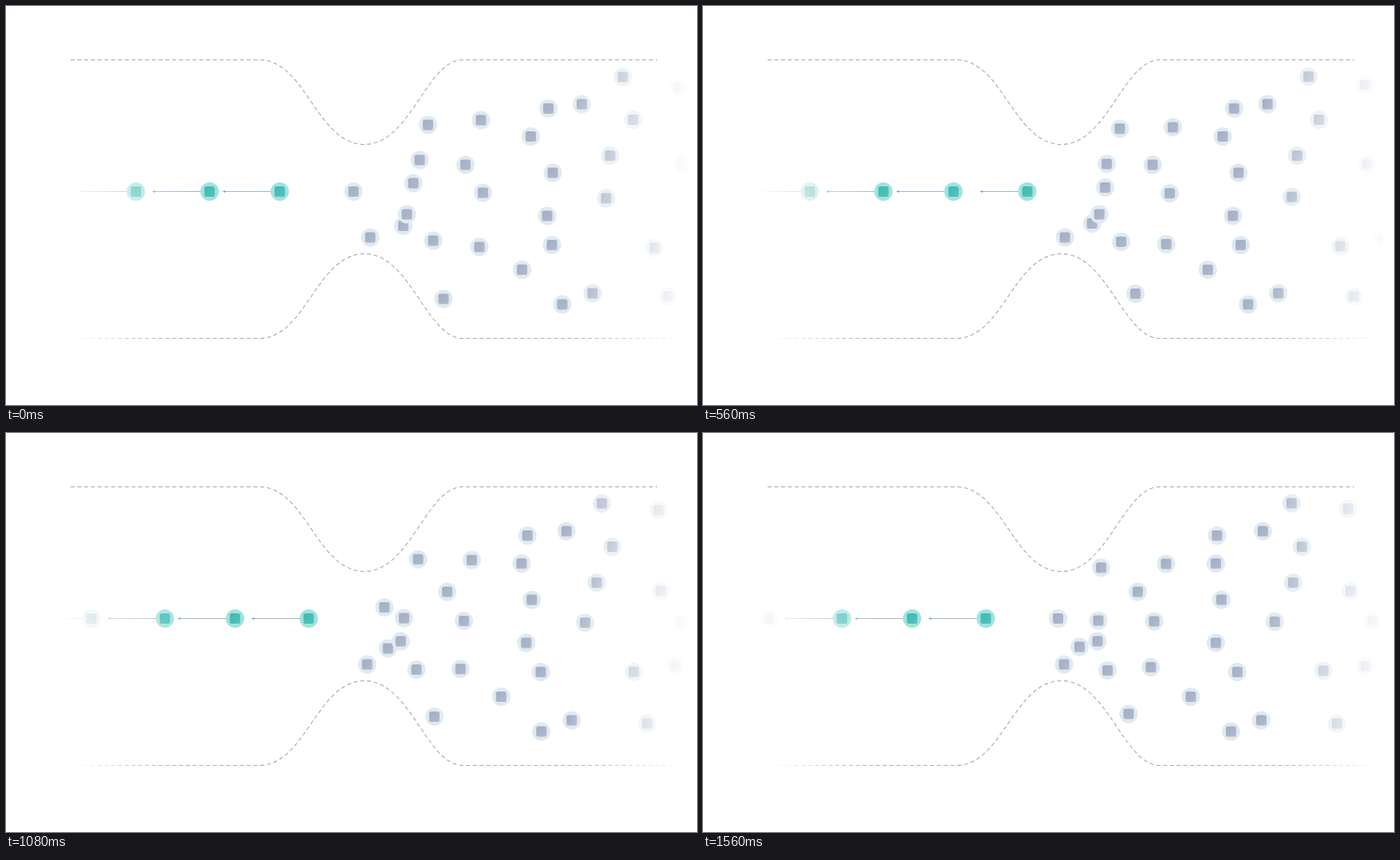
Write an HTML page that moves like this. It is 867x500 px and loops after 1.6 s.

```html
<!DOCTYPE html>
<html lang="en">
<head>
<meta charset="utf-8">
<title>Bottleneck flow</title>
<style>
  html, body { margin: 0; width: 100%; height: 100%; overflow: hidden; background: #fff; }
  svg { display: block; width: 100vw; height: 100vh; }
</style>
</head>
<body>
<svg viewBox="0 0 867 500" preserveAspectRatio="none">
  <defs>
    <linearGradient id="left" gradientUnits="userSpaceOnUse" x1="65" x2="225">
      <stop offset="0" stop-color="#fff"/>
      <stop offset="1" stop-color="#fff" stop-opacity="0"/>
    </linearGradient>
    <linearGradient id="right" gradientUnits="userSpaceOnUse" x1="705" x2="858">
      <stop offset="0" stop-color="#fff" stop-opacity="0"/>
      <stop offset="1" stop-color="#fff"/>
    </linearGradient>
    <linearGradient id="shine" x2="1" y2="1">
      <stop offset="0" stop-color="#fff" stop-opacity="0"/>
      <stop offset="1" stop-color="#fff" stop-opacity=".14"/>
    </linearGradient>
    <linearGradient id="floor" gradientUnits="userSpaceOnUse" x1="81" x2="840">
      <stop offset="0" stop-color="#a9b6cc" stop-opacity="0"/>
      <stop offset=".16" stop-color="#a9b6cc"/>
      <stop offset=".33" stop-color="#a6a9b1"/>
      <stop offset=".64" stop-color="#a6a9b1"/>
      <stop offset=".85" stop-color="#a9b6cc"/>
      <stop offset="1" stop-color="#a9b6cc" stop-opacity=".1"/>
    </linearGradient>
  </defs>
  <g id="links"></g>
  <g id="dots"></g>
  <rect width="225" height="500" fill="url(#left)"/>
  <rect x="705" width="162" height="500" fill="url(#right)"/>
  <g fill="none" stroke-width="1.1" stroke-dasharray="5 3.5">
    <path stroke="#a6a9b1" d="M81 67.5H318C376 67.5 390 173.5 450 173.5C507 173.5 528 67.5 573 67.5H817"/>
    <path stroke="url(#floor)" d="M81 416.5H318C376 416.5 390 310.5 450 310.5C507 310.5 528 416.5 573 416.5H840"/>
  </g>
</svg>
<script>
const LOOP = 1600, STEP = 40, END = 1560, MID = 232.5;
const SPEED = 0.052, GAP = 71.5, MERGE = 1120;
const SLATE = [[225, 234, 240], [162, 175, 195]];
const TEAL = [[159, 228, 222], [62, 184, 178]];

const clamp = v => Math.max(0, Math.min(1, v));
const mix = (a, b, k) => a + (b - a) * k;
const smooth = v => v * v * (3 - 2 * v);
const easeOut = (t, power) => 1 - (1 - t / END) ** power;

const glide = (x, y, dx, dy, power) => t => {
  const k = easeOut(t, power);
  return [x + dx * k, y + dy * k];
};

// Drifts left, a little slower close to the neck.
const roam = ([x, y, dy = 0]) =>
  glide(x, y, -26 - 9.5 * clamp((x - 498) / 150), dy, 1.14);

// Creeps forward while the neck is busy.
const creep = ([x, y, dy = 0]) => glide(x, y, -15, dy, 1.25);

// Comes to rest after a short way.
const brake = ([x, y, reach]) => glide(x, y, -reach, 0, 2.8);

// Creeps until its turn, then curves into the neck.
const merge = ([x, y, wake]) => t => {
  const wait = Math.min(t, wake);
  const cx = x - 0.0115 * wait, cy = y + 0.0085 * wait;
  const v = clamp((t - wake) / MERGE);
  return [mix(cx, 445.5, v), mix(cy, MID, smooth(v))];
};

// Passes along the axis.
const cruise = x => t => [x - SPEED * t, MID];

const roaming = [
  [498.5, 275.5, -7.5], [536, 294, 3.5], [576.5, 199], [598.5, 234, 2],
  [594, 302, -8.5], [647.5, 330.5], [679, 263], [680.5, 128.5], [686, 209],
  [698, 374], [736, 360], [753, 241, -4.5], [774, 89, -1], [787, 142.5],
  [814, 303, -5], [831, 364], [845, 102, -7], [848, 198], [867, 292], [876, 236]
];
const creeping = [
  [511, 222, 13], [549, 367, -15], [596, 143, 21], [658.5, 163.5]
];
const braking = [
  [457, 290, 4], [503, 261, 8], [685, 299.5, 14.5], [722.5, 123, 20], [758, 187.5, 17.5]
];
const merging = [[519, 193, 440], [529.5, 149, 1320]];
const line = [163, 255.5, 343.5, 436].map(cruise);

function add(parent, tag, attrs = {}) {
  const el = document.createElementNS("http://www.w3.org/2000/svg", tag);
  for (const key in attrs) el.setAttribute(key, attrs[key]);
  return parent.appendChild(el);
}

const dotLayer = document.getElementById("dots");
const linkLayer = document.getElementById("links");

function makeDot(path) {
  const g = add(dotLayer, "g");
  const box = { x: -6.5, y: -6.5, width: 13, height: 13, rx: 2.8 };
  const halo = add(g, "circle", { r: 11.5 });
  const core = add(g, "rect", box);
  add(g, "rect", { ...box, fill: "url(#shine)" });
  return { path, g, halo, core };
}

function makeLink(path, i) {
  const stem = add(linkLayer, "path", { stroke: "#9fb6cf" });
  const head = add(linkLayer, "path", { fill: "#719fb8" });
  return { path, stem, head, grows: i === line.length - 1 };
}

const dots = [
  ...roaming.map(roam), ...creeping.map(creep), ...braking.map(brake),
  ...merging.map(merge), ...line
].map(makeDot);
const links = line.map(makeLink);

function blend(part, k) {
  return `rgb(${SLATE[part].map((v, i) => Math.round(mix(v, TEAL[part][i], k)))})`;
}

function draw(t) {
  for (const { path, g, halo, core } of dots) {
    const [x, y] = path(t);
    const tint = clamp((436 - x) / 17) * clamp((x - 95) / 55);
    g.setAttribute("transform", `translate(${x.toFixed(2)} ${y.toFixed(2)})`);
    halo.setAttribute("fill", blend(0, tint));
    core.setAttribute("fill", blend(1, tint));
  }
  const grown = 1 - (1 - clamp((t - 180) / 650)) ** 2;
  for (const { path, stem, head, grows } of links) {
    const x = path(t)[0], len = grows ? GAP * grown : GAP, tip = x - len;
    stem.setAttribute("d", len > 11 ? `M${x - 11} ${MID}H${tip}` : "");
    head.setAttribute("d", len > 50 ? `M${tip} ${MID}l3 -1.6v3.2z` : "");
  }
}

const start = performance.now();
function tick() {
  const t = (performance.now() - start) % LOOP;
  draw(Math.floor(t / STEP) * STEP);
  requestAnimationFrame(tick);
}
tick();
</script>
</body>
</html>
```
